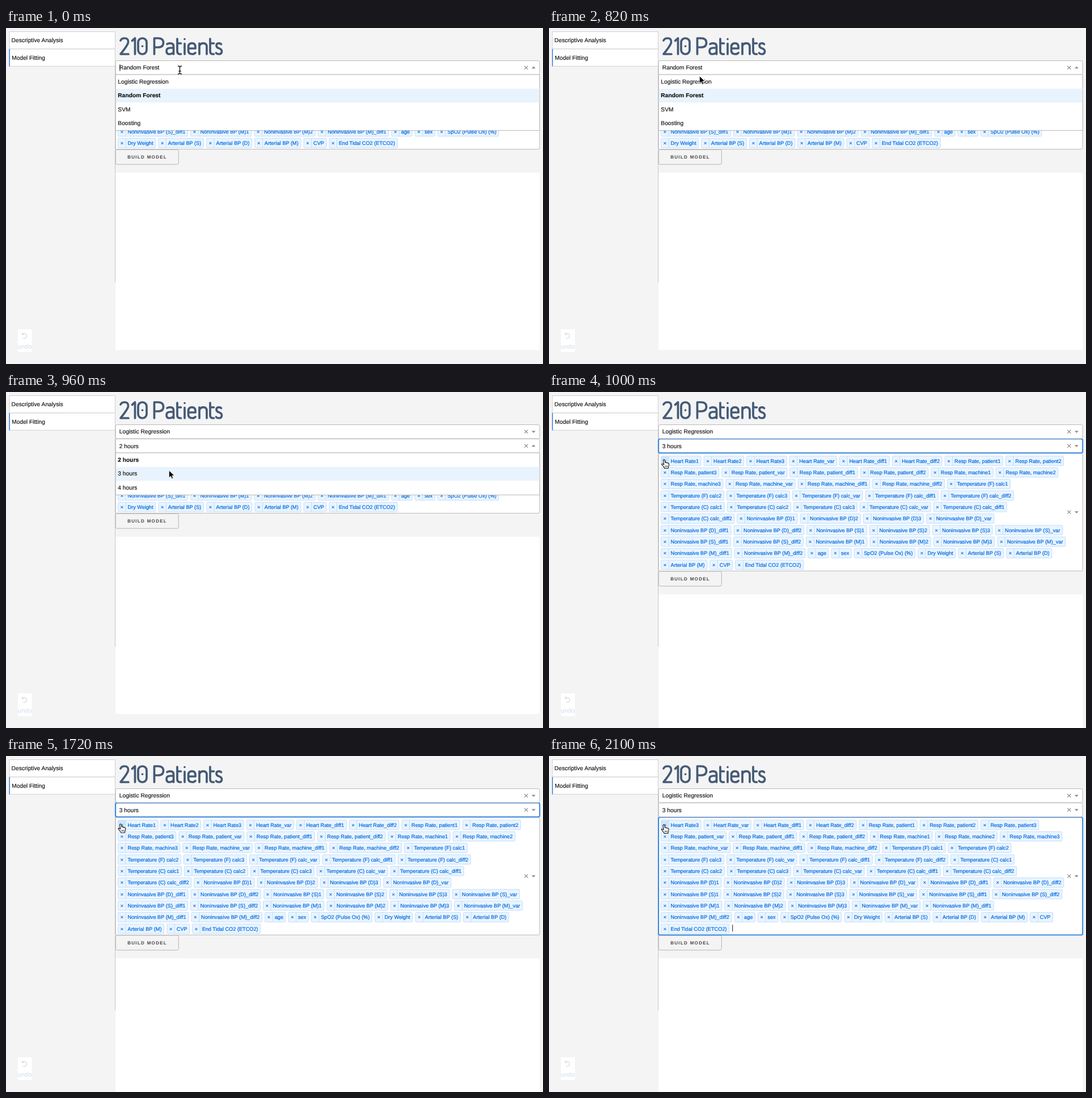
These frames come from a looping animation (947x592 px, 2.12 s). An HTML page:

```html
<!DOCTYPE html>
<html lang="en">
<head>
<meta charset="utf-8">
<title>Model fitting</title>
<style>
  html, body { margin: 0; width: 100%; height: 100%; overflow: hidden; background: #f4f4f4; }
  svg { display: block; width: 947px; height: 592px; }
  text { font-family: "Liberation Sans", Arial, sans-serif; font-size: 10.25px; fill: #111; stroke: #111; stroke-width: .15px; text-rendering: geometricPrecision; white-space: pre; }
  .bold { font-weight: bold; }
  .tag { font-size: 9.2px; fill: #006ae0; stroke: #006ae0; stroke-width: .22px; }
  .button { font-size: 8px; font-weight: bold; letter-spacing: 1.3px; fill: #444; stroke: none; }
  .undo { font-size: 11px; fill: #cfdbe8; stroke: none; }
  .heading { fill: none; stroke: #445a76; stroke-width: 3.7; stroke-linecap: round; stroke-linejoin: round; }
  .ghost { font-size: 33px; fill: transparent; stroke: none; }
</style>
</head>
<body>
<svg viewBox="0 0 947 592" xmlns="http://www.w3.org/2000/svg">
  <rect width="947" height="592" fill="#f4f4f4"/>
  <path d="M192.5 6V449" stroke="#c6c6c6"/>
  <rect x="6" y="6.5" width="186.5" height="30.5" fill="#fff" stroke="#d0d0d0"/>
  <rect x="6" y="37" width="186.5" height="30.3" fill="#fff" stroke="#d0d0d0"/>
  <path d="M6.2 37V67.5" stroke="#2f7fe0" stroke-width="1.4"/>
  <text x="9.6" y="25">Descriptive Analysis</text>
  <text x="10.2" y="55.5">Model Fitting</text>

  <text class="ghost" x="200" y="47">210 Patients</text>
  <g class="heading" aria-hidden="true">
    <path d="M202 22Q204 18 209 18Q216 18 215.5 25Q215 30 202 46H216"/>
    <path d="M222.5 22.5L227.5 18V46"/>
    <rect x="233" y="18" width="15" height="28" rx="7.2"/>
    <path d="M240.5 32h.01"/>
    <path d="M261.5 46V18H268Q277.5 18 277.5 26Q277.5 34 268 34H261.5"/>
    <path d="M284 28.2Q286 26.8 289.5 26.8Q295.5 26.8 295.5 32.3V46M295.5 35H290Q283 35 283 40.5Q283 46 288 46Q293 46 295.5 42.5"/>
    <path id="t" d="M302 19V41Q302 46 307 46H308.5M302 27H308.5"/>
    <path d="M315 27.5V46M315 19.5h.01"/>
    <path d="M321.5 36H334V33.5Q334 26.8 328 26.8Q321.5 26.8 321.5 33.5V39.5Q321.5 46 328.5 46Q332 46 334 43.7"/>
    <path d="M341 46V27M341 31.5Q343 26.8 348 26.8Q354 26.8 354 33V46"/>
    <use href="#t" x="58"/>
    <path d="M379.5 28.5Q378 26.8 375.5 26.8Q371 26.8 371 31Q371 34.3 375.5 35.7Q380.5 37.2 380.5 41Q380.5 46 375.5 46Q372 46 370.5 44"/>
  </g>

  <rect x="21" y="531" width="24.5" height="40" fill="#fff"/>
  <path d="M29 539.5A4.3 4.3 0 1 1 30 546.3M28.6 536.8V540.2H32" fill="none" stroke="#cfdbe8" stroke-width="1.2"/>
  <text class="undo" x="20.8" y="565">undo</text>

  <g id="panel"></g>
  <g id="pointer"></g>
</svg>
<script>
const LOOP = 2120, STEP = 20;
const LEFT = 193.3, RIGHT = 941, ROW = 20.34, LIST_TOP = 108;
const TAG_LEFT = 197.6, TAG_PAD = 21.2, TAG_GAP = 4.75, WRAP = 912.8;
const MODELS = ["Logistic Regression", "Random Forest", "SVM", "Boosting"];
const HOURS = ["2 hours", "3 hours", "4 hours"];

const panel = document.getElementById("panel");
const pointer = document.getElementById("pointer");
const ruler = document.createElement("canvas").getContext("2d");
ruler.font = '92px "Liberation Sans", Arial, sans-serif';
const tagTextWidth = s => ruler.measureText(s).width / 10;

const withSuffixes = (base, suffixes) => suffixes.map(s => base + s);
const VITALS = ["Heart Rate", "Resp Rate, patient", "Resp Rate, machine",
  "Temperature (F) calc", "Temperature (C) calc",
  "Noninvasive BP (D)", "Noninvasive BP (S)", "Noninvasive BP (M)"];
const OTHERS = ["age", "sex", "SpO2 (Pulse Ox) (%)", "Dry Weight", "Arterial BP (S)",
  "Arterial BP (D)", "Arterial BP (M)", "CVP", "End Tidal CO2 (ETCO2)"];
const LONG_LIST = [
  ...VITALS.flatMap(v => withSuffixes(v, ["1", "2", "3", "_var", "_diff1", "_diff2"])), ...OTHERS];
const SHORT_LIST = [
  ...VITALS.flatMap(v => withSuffixes(v, v.endsWith("machine") ? ["1"] : ["1", "2", "_diff1"])), ...OTHERS];

const rect = (x, y, w, h, attrs) => `<rect x="${x}" y="${y}" width="${w}" height="${h}" ${attrs}/>`;
const label = (x, y, s, cls = "") => `<text x="${x}" y="${y}" class="${cls}">${s}</text>`;
const caret = (x, y) => `<path d="M${x} ${y}v12" stroke="#111"/>`;

function control(top, bottom, { open = false, focused = false } = {}) {
  const mid = (top + bottom) / 2, dir = open ? -1 : 1;
  const box = attrs => rect(LEFT, top, RIGHT - LEFT, bottom - top, `rx="2.5" ${attrs}`);
  const border = focused ? 'stroke="#1f78e0" stroke-width="1.6"' : 'stroke="#b9b9b9"';
  return (focused ? box('fill="none" stroke="#007eff" stroke-opacity=".12" stroke-width="4.4"') : "") +
    box(`fill="#fff" ${border}`) +
    `<path d="M914.3 ${mid - 3}l6 6m0 -6l-6 6" stroke="#888" stroke-width="1.2"/>` +
    `<path d="M926.8 ${mid - dir * 1.4}h7l-3.5 ${dir * 3.5}z" fill="#888"/>`;
}

function select(top, value, state) {
  return control(top, top + 24.5, state) + label(199.8, top + 15.8, value);
}

function menu(top, options, selected, hovered) {
  const pitch = 24.25;
  return rect(LEFT, top, RIGHT - LEFT, options.length * pitch + 1.4, 'fill="#fff" stroke="#b9b9b9"') +
    options.map((name, i) => {
      const y = top + .7 + i * pitch;
      return (i === hovered ? rect(LEFT + .5, y, RIGHT - LEFT - 1, pitch, 'fill="#e8f3fd"') : "") +
        label(197.3, y + 15.2, name, i === selected ? "bold" : "");
    }).join("");
}

function tagList(names, focused, hoverFirst) {
  let x = TAG_LEFT, row = 0, tags = "";
  names.forEach((name, i) => {
    const width = tagTextWidth(name) + TAG_PAD;
    if (x + width > WRAP) { x = TAG_LEFT; row++; }
    const y = LIST_TOP + 4.9 + row * ROW;
    tags += rect(x, y, width - .4, 16.8, 'rx="1.4" fill="#e9f4ff" stroke="#b5d8fb" stroke-width=".8"') +
      (i === 0 && hoverFirst ? rect(x + .4, y + .4, 12.8, 16, 'fill="#cfe5fb"') : "") +
      `<path d="M${x + 13.5} ${y}v16.8" stroke="#b5d8fb" stroke-width=".8"/>` +
      label(x + 4.1, y + 11.8, "×", "tag") + label(x + 16.9, y + 11.8, name, "tag");
    x += width + TAG_GAP;
  });
  const bottom = LIST_TOP + (row + 1) * ROW + 3.9;
  return { bottom, endX: x, svg: control(LIST_TOP, bottom, { focused }) + tags };
}

// Hard changes of the form, by time.
function formState(t) {
  const removed = t >= 2020 ? 2 : t >= 1760 ? 1 : 0;
  return {
    model: t < 880 ? 1 : 0,
    hours: t < 980 ? 0 : 1,
    modelOpen: t < 880,
    modelHover: t < 840 ? 1 : 0,
    hoursOpen: t >= 920 && t < 980,
    hoursHover: t < 940 ? 0 : 1,
    focus: t < 920 ? "model" : removed ? "list" : "hours",
    names: t < 1000 ? SHORT_LIST : LONG_LIST.slice(removed),
    hoverFirst: t >= 1000,
    modelCaret: t < 620,
    listCaret: t >= 2060
  };
}

function drawPanel(s) {
  const list = tagList(s.names, s.focus === "list", s.hoverFirst);
  const b = list.bottom;
  let out = rect(193, b + 41.2, 748, 312.5, 'fill="#fff"') +
    rect(193.3, b + .7, 111, 26, 'rx="2.5" fill="#f4f4f4" stroke="#b4b4b4"') +
    label(214.2, b + 16.6, "BUILD MODEL", "button") + list.svg;
  if (s.listCaret) out += caret(list.endX + .8, b - 18);
  out += select(82.7, HOURS[s.hours], { open: s.hoursOpen, focused: s.focus === "hours" && !s.hoursOpen });
  out += select(57.6, MODELS[s.model], { open: s.modelOpen, focused: s.focus === "model" && !s.modelOpen });
  if (s.modelOpen) out += menu(82.1, MODELS, s.model, s.modelHover);
  if (s.hoursOpen) out += menu(107.2, HOURS, s.hours, s.hoursHover);
  if (s.modelCaret) out += caret(201, 64);
  return out;
}

const POINTERS = {
  beam: '<path d="M-3.5 -7Q0 -7 0 -4.5Q0 -7 3.5 -7M0 -5V5M-3.5 7Q0 7 0 4.5Q0 7 3.5 7M-2 2H2" fill="none" stroke="#111" stroke-width="1.3"/>',
  arrow: '<path d="M0 0V13.2L3.1 10.3L5.3 15L7.6 14L5.5 9.4H9.8Z" fill="#000" stroke="#fff" stroke-width=".9"/>',
  hand: '<path d="M0 1.2Q0 -.4 1.3 -.4Q2.5 -.4 2.7 1L3.5 5Q5.3 3.8 6 5.5Q7.8 4.6 8.3 6.1Q10 5.6 10.1 7.5L9.7 11.2L8.5 15H2.2Q1.5 12.5 -1.7 9.4Q-3.4 7.5 -2 7Q-1 6.7 1.2 8.7Z" fill="#fff" stroke="#111" stroke-width="1.1" stroke-linejoin="round"/><path d="M3.5 10v3M5.4 10v3M7.3 10v3" stroke="#111" stroke-width=".8"/>'
};
const PATH = [[0, 306.5, 74], [420, 306.5, 74], [820, 265.3, 84.5], [880, 266, 95], [920, 275, 108],
  [960, 287.3, 138], [980, 262, 134], [1000, 201.5, 119.5], [1500, 198.7, 116.5], [1540, 198.7, 116.5],
  [1760, 201, 121], [2120, 201, 121.5]];

function drawPointer(t) {
  const i = PATH.findIndex(p => p[0] > t);
  const [t0, x0, y0] = PATH[i - 1], [t1, x1, y1] = PATH[i];
  const k = (t - t0) / (t1 - t0);
  const x = x0 + (x1 - x0) * k, y = y0 + (y1 - y0) * k;
  const kind = t >= 1000 ? "hand" : y < 82 ? "beam" : "arrow";
  return `<g transform="translate(${x} ${y})">${POINTERS[kind]}</g>`;
}

let shownPanel = "", start;
function render(elapsed) {
  const t = Math.floor(elapsed % LOOP / STEP) * STEP;
  const svg = drawPanel(formState(t));
  if (svg !== shownPanel) panel.innerHTML = shownPanel = svg;
  pointer.innerHTML = drawPointer(t);
}
function tick(now) {
  start ??= now;
  render(Math.max(0, now - start));
  requestAnimationFrame(tick);
}
render(0);
requestAnimationFrame(tick);
</script>
</body>
</html>
```
